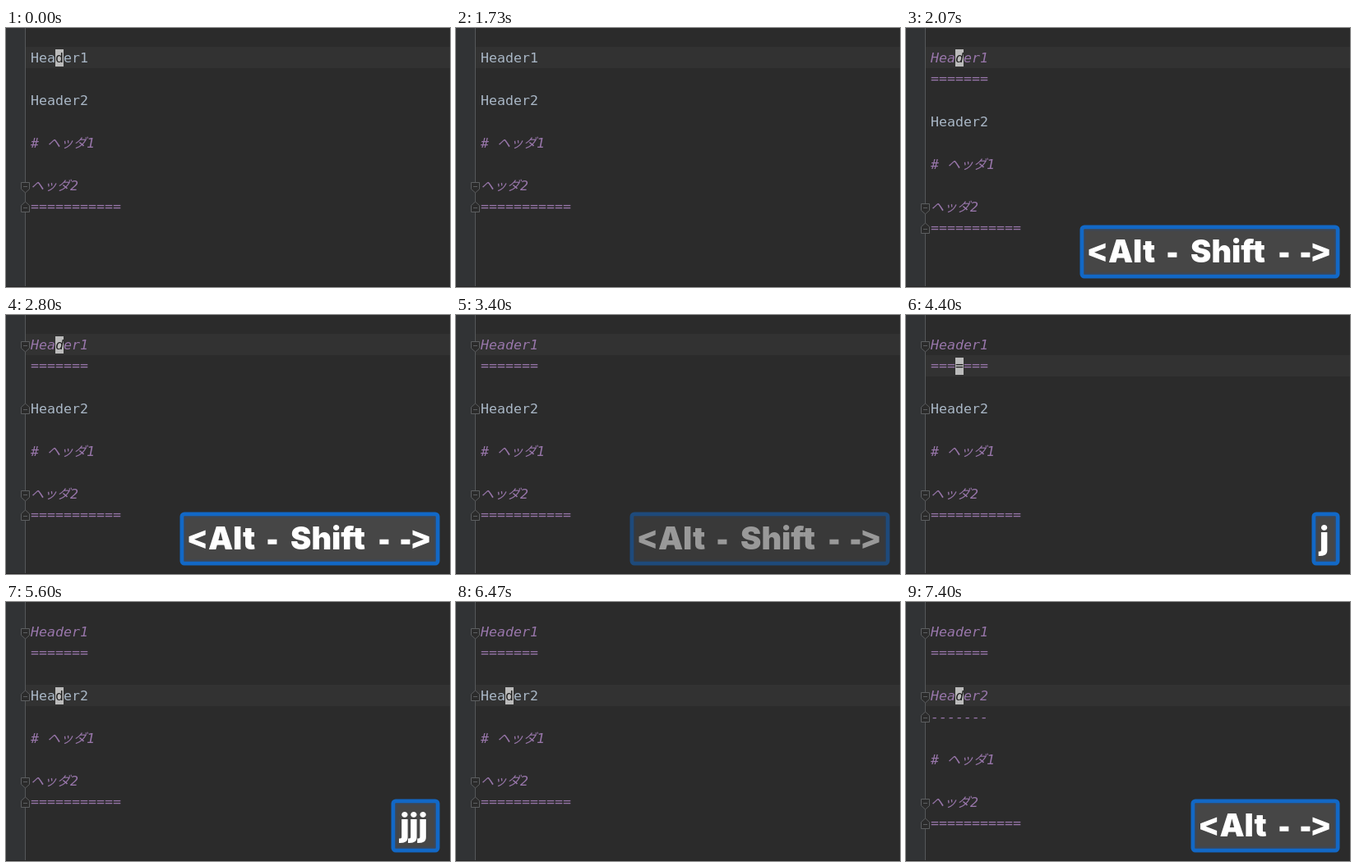
Recreate the animation shown at these times as an HTML page. Size 540x316 px, loop 8000 ms.

```html
<!DOCTYPE html>
<html lang="ja">
<head>
<meta charset="utf-8">
<title>Header toggle</title>
<style>
  html, body { margin: 0; width: 100%; height: 100%; overflow: hidden; background: #2b2b2b; }
  svg { display: block; width: 540px; height: 316px; }
  text { white-space: pre; }
  .code { font: 16.6px "DejaVu Sans Mono", monospace; fill: #a9b7c6; }
  .head { font-style: italic; fill: #9876aa; }
  .kana { font-family: "Noto Sans CJK JP", "Noto Sans CJK", sans-serif; font-size: 16px; }
  .code.under { fill: #202020; }
  .fold { fill: #2b2b2b; stroke: #5c5e60; }
  .key { font: 900 38px Inter, "Open Sans", sans-serif; fill: #fff; text-anchor: middle; }
  .sign { font: bold 37px "Liberation Sans", sans-serif; stroke: #fff; stroke-width: 1.6; }
</style>
</head>
<body>
<svg viewBox="0 0 540 316">
  <rect width="540" height="316" fill="#2b2b2b"/>
  <rect width="23" height="316" fill="#313335"/>
  <rect id="current" x="24" width="516" height="26" fill="#323232"/>
  <path d="M23.5 0V316" stroke="#555759"/>
  <rect y="315" width="540" height="1" fill="#262626"/>
  <g id="page"></g>
  <g id="caret"></g>
  <g id="label"></g>
</svg>
<script>
const LOOP = 8000;
const FIRST = 1800, FIRST_FOLDS = 2400;
const DOWN = [4270, 4730, 5130];
const SECOND = 6870, SECOND_FOLDS = 7130;

// Times at which the caret goes dark and comes back
const CARET_OFF = [[270, 800], [1330, FIRST], [3270, 3800], [5670, 6200], [6730, SECOND]];

// Each word is [text, centre x]
const COMBO_END = [["-", 460], ["-", 486], [">", 504.5]];
const LABELS = [
  { from: FIRST, fade: 3270, end: 3540, left: 212,
    words: [["<", 232.5], ["Alt", 274.5], ["-", 324], ["Shift", 391.5], ...COMBO_END] },
  { from: DOWN[0], fade: DOWN[1], left: 494, words: [["j", 508.5]] },
  { from: DOWN[1], fade: DOWN[2], left: 481.5, words: [["jj", 502]] },
  { from: DOWN[2], fade: 6070, end: 6340, left: 469, words: [["jjj", 496]] },
  { from: SECOND, fade: LOOP, left: 347, words: [["<", 368], ["Alt", 410], ...COMBO_END] }
];

const byId = id => document.getElementById(id);
const rowY = row => 36 + 26 * row;
const escapeText = s => s.replace(/</g, "&lt;").replace(/>/g, "&gt;");

const code = (s, row, kind = "", x = 30) => {
  const baseline = rowY(row) + (s.startsWith("=") ? 5 : 6);
  return `<text class="code ${kind}" x="${x}" y="${baseline}">${s}</text>`;
};

const japanese = (prefix, digit, row) => {
  const x = 30 + prefix.length * 10;
  return code(prefix, row, "head") + code("ヘッダ", row, "head kana", x) +
    code(digit, row, "head", x + 48);
};

const fold = (row, opens) => {
  const y = rowY(row) + .5;
  const shape = opens
    ? `M18.5 ${y - 4}h10v8l-5 4.5l-5 -4.5z`
    : `M18.5 ${y + 6}h10v-8l-5 -4.5l-5 4.5z`;
  return `<path class="fold" d="${shape}M21 ${y + 1}h5"/>`;
};

function pageMarkup(t) {
  const first = t >= FIRST, second = t >= SECOND;
  const h2 = first ? 3 : 2;
  const h3 = h2 + (second ? 3 : 2);
  let out = code("Header1", 0, first ? "head" : "");
  if (first) out += code("=======", 1, "head");
  out += code("Header2", h2, second ? "head" : "");
  if (second) out += code("-------", h2 + 1, "head");
  out += japanese("# ", "1", h3) + japanese("", "2", h3 + 2) + code("===========", h3 + 3, "head");
  out += fold(h3 + 2, true) + fold(h3 + 3, false);
  if (t >= FIRST_FOLDS) {
    const split = t >= SECOND_FOLDS;
    out += fold(0, true) + fold(h2, split);
    if (split) out += fold(h2 + 1, false);
  }
  return out;
}

function caretMarkup(t, row) {
  if (CARET_OFF.some(([off, on]) => t >= off && t < on)) return "";
  const x = row === 2 ? 30 : 60;
  const glyph = ["d", "=", "", "d"][row];
  const slanted = row === 1 || (row === 0 ? t >= FIRST : t >= SECOND);
  return `<rect x="${x}" y="${rowY(row) - 10}" width="10" height="21" fill="#bbb"/>` +
    code(glyph, row, (slanted ? "head " : "") + "under", x);
}

const word = ([s, x]) => {
  const kind = /[<>-]/.test(s) ? "key sign" : "key";
  return `<text class="${kind}" x="${x}" y="286">${escapeText(s)}</text>`;
};

const labelMarkup = ({ left, words }) =>
  `<rect x="${left + 2}" y="243" width="${523 - left}" height="60" rx="3"
    fill="#464646" stroke="#1268c6" stroke-width="5"/>` +
  `<rect x="${left + 5.5}" y="246.5" width="${516 - left}" height="53"
    fill="none" stroke="#3d4756" stroke-width="2"/>` +
  words.map(word).join("");

const shown = {};
function show(id, markup) {
  if (shown[id] === markup) return;
  shown[id] = markup;
  byId(id).innerHTML = markup;
}

function draw(now) {
  const t = now % LOOP;
  const row = DOWN.filter(time => t >= time).length;
  byId("current").setAttribute("y", rowY(row) - 13);
  show("page", pageMarkup(t));
  show("caret", caretMarkup(t, row));

  const label = LABELS.find(l => t >= l.from && t < (l.end || l.fade));
  show("label", label ? labelMarkup(label) : "");
  const opacity = label && t > label.fade ? (label.end - t) / (label.end - label.fade) : 1;
  byId("label").setAttribute("opacity", opacity);
}

let start;
function tick(now) {
  start ??= now;
  draw(now - start);
  requestAnimationFrame(tick);
}
draw(0);
requestAnimationFrame(tick);
</script>
</body>
</html>
```
